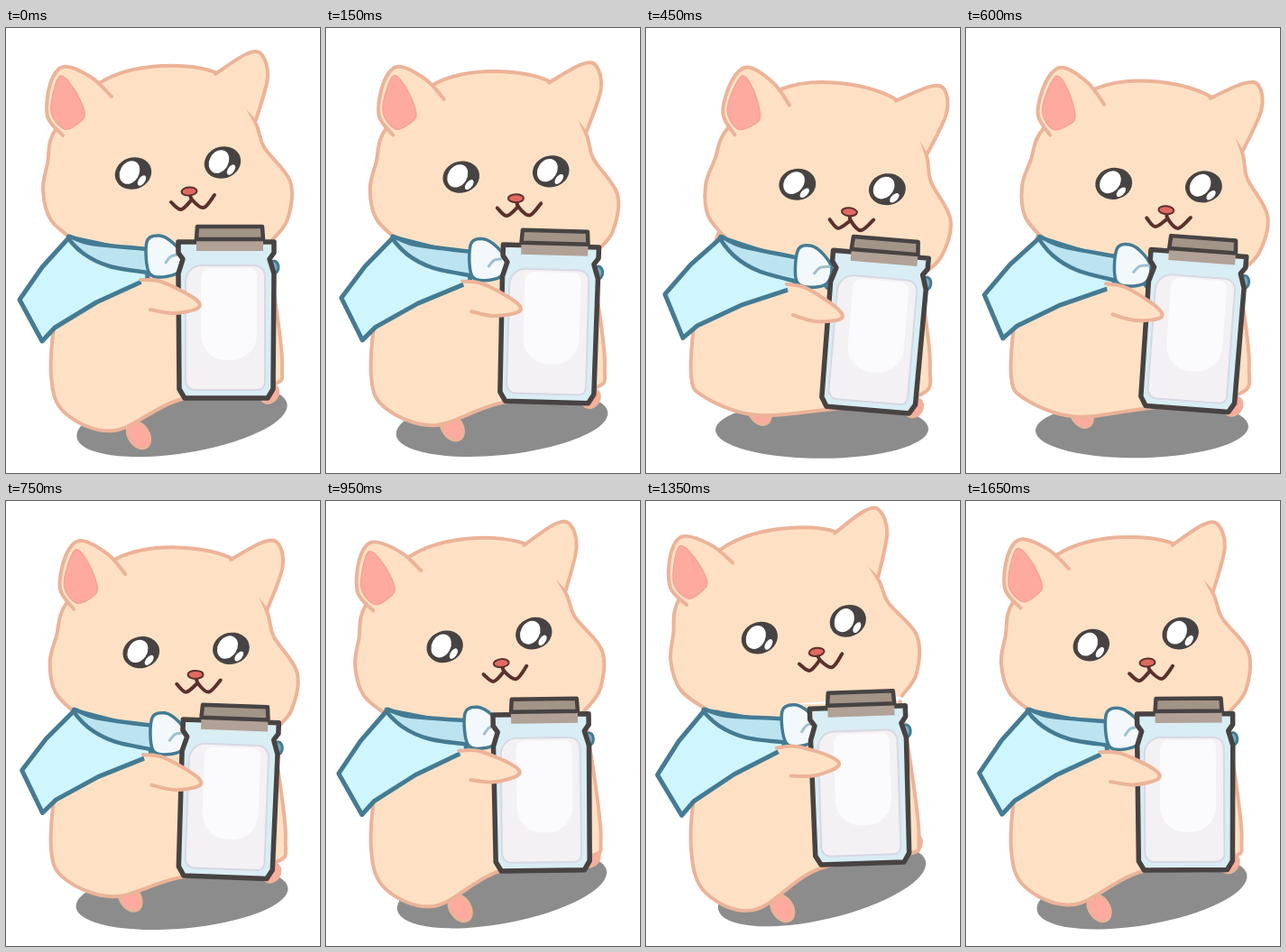
An HTML page with a canvas for the animation above (1.7 s loop, 348 px wide and 493 px high).

```html
<!DOCTYPE html>
<html lang="en">
<head>
<meta charset="utf-8">
<title>Hamster with a milk jar</title>
<style>
html, body { margin: 0; width: 100%; height: 100%; overflow: hidden; background: #fff; }
canvas { display: block; width: 348px; height: 493px; }
</style>
</head>
<body>
<canvas id="stage" width="348" height="493"></canvas>
<script>
const c = document.getElementById('stage').getContext('2d');
const LOOP = 1700, STEP = 50;
const SKIN = '#fee1c4', EDGE = '#ecb398', PINK = '#ffaa9f', DARK = '#474342',
      BLUE = '#447b93', MOUTH = '#5c302d';

// Rest, lean right, swing through, lean left, rest.
const POSES = [
  { t: 0, x: 0, y: 0, tilt: 0 },
  { t: 515, x: 31, y: 24, tilt: 11.5 },
  { t: 950, x: -9.5, y: -1, tilt: -1.6 },
  { t: 1220, x: -21.5, y: -17.5, tilt: -5.4 },
  { t: LOOP, x: 0, y: 0, tilt: 0 }
];

function poseAt(t) {
  const i = POSES.findIndex(p => p.t > t), a = POSES[i - 1], b = POSES[i];
  const p = (t - a.t) / (b.t - a.t);
  const mix = k => a[k] + (b[k] - a[k]) * p;
  return { x: mix('x'), y: mix('y'), tilt: mix('tilt') };
}

function paint(fill, line, width) {
  if (fill) { c.fillStyle = fill; c.fill(); }
  if (line) { c.strokeStyle = line; c.lineWidth = width; c.stroke(); }
}

// Smooth curve through a flat list of x, y values.
function curve(pts, fill, line, width = 4, closed = false) {
  const n = pts.length / 2;
  const at = i => {
    i = closed ? (i + n) % n : Math.max(0, Math.min(n - 1, i));
    return [pts[2 * i], pts[2 * i + 1]];
  };
  c.beginPath();
  c.moveTo(...at(0));
  for (let i = 0; i < (closed ? n : n - 1); i++) {
    const [a, b, d, e] = [at(i - 1), at(i), at(i + 1), at(i + 2)];
    c.bezierCurveTo(b[0] + (d[0] - a[0]) / 6, b[1] + (d[1] - a[1]) / 6,
                    d[0] - (e[0] - b[0]) / 6, d[1] - (e[1] - b[1]) / 6, ...d);
  }
  paint(fill, line, width);
}

function poly(pts, fill, line, width) {
  c.beginPath();
  for (let i = 0; i < pts.length; i += 2) c.lineTo(pts[i], pts[i + 1]);
  c.closePath();
  paint(fill, line, width);
}

// Outline mirrored about x = mid, from [half width, y] pairs.
function mirrored(mid, half, fill, line, width) {
  const right = half.map(([w, y]) => [mid + w, y]);
  const left = half.map(([w, y]) => [mid - w, y]).reverse();
  poly([...right, ...left].flat(), fill, line, width);
}

function oval(x, y, rx, ry, deg, fill, line, width) {
  c.beginPath();
  c.ellipse(x, y, rx, ry, deg * Math.PI / 180, 0, 7);
  paint(fill, line, width);
}

function box(x, y, w, h, r, fill, line, width) {
  c.beginPath();
  c.roundRect(x, y, w, h, r);
  paint(fill, line, width);
}

// Shift a part by (dx, dy) and tilt it about (px, py).
function moved(px, py, dx, dy, deg, draw) {
  c.save();
  c.translate(px + dx, py + dy);
  c.rotate(deg * Math.PI / 180);
  c.translate(-px, -py);
  draw();
  c.restore();
}

// Leaning right flattens the left of the belly and lowers its right.
function body(q) {
  const low = x => (x < 160 ? -18 : 12) * q;
  curve([80, 228, 57, 305, 50, 385, 66, 427, 120, 446 , 192, 412, 292, 396, 306, 375, 298, 300, 285, 222]
    .map((v, i, all) => i % 2 ? v + (v > 390 ? low(all[i - 1]) : 0) : v + (v > 280 ? 9 * q : 0)),
    SKIN, EDGE);
}

function eye(x, y) {
  oval(x, y, 20.5, 17.5, -18, DARK);
  oval(x - 4, y - 1, 10.5, 13.5, 30, '#fff');
  oval(x + 9.5, y + 8, 3.5, 6.5, 35, '#fff');
}

function head() {
  curve([294, 236, 312, 212, 315, 170, 286, 132, 275, 102, 240, 53, 172, 42, 105, 60,
         55, 112, 46, 150, 41, 180, 50, 213, 78, 237], SKIN, EDGE);
  curve([232, 51, 266, 29, 283, 29, 290, 55, 277, 102], SKIN, EDGE);
  curve([117, 76, 95, 55, 64, 43, 49, 62, 46, 98, 63, 119], SKIN, EDGE);
  curve([59, 54, 75, 67, 87, 93, 82, 104, 65, 112, 50, 92], PINK, '#f5a392', 1.5, true);
  eye(141, 161);
  eye(240, 149);
  curve([183, 193, 194, 201, 206, 190], null, MOUTH);
  curve([204, 182, 206, 190, 219, 199, 231, 185], null, MOUTH);
  oval(203, 181, 8.5, 4.5, -4, '#e06a62', MOUTH, 2);
}

function scarf() {
  poly([70, 232, 40, 265, 15, 301, 40, 347, 54, 332, 100, 304, 157, 278, 155, 250],
       '#cff5fe', BLUE, 5);
  curve([157, 271, 115, 264, 86, 250, 69, 231, 95, 239, 160, 245], '#bce4f0', BLUE, 4.5);
  oval(197, 265, 8, 11, 10, '#75abc1', BLUE, 3);
  curve([156, 237, 170, 230, 186, 239, 196, 254, 189, 272, 160, 273], '#f3f8fc', BLUE, 3.5, true);
  curve([193, 251, 183, 253, 177, 260], null, '#9fc0cf', 3);
}

function jar() {
  oval(297, 265, 5, 7, 0, '#75abc1', BLUE, 3);
  mirrored(244, [[53, 237], [53, 249], [48, 256], [53, 272], [52, 400], [46, 410]],
           '#d8edf4', DARK, 5.5);
  box(199, 263, 88, 138, [18, 12, 8, 10], '#f3f1f4', '#d8d8e2', 2);
  box(216, 266, 62, 102, [10, 8, 28, 28], '#fbfafc');
  mirrored(248, [[37, 234], [37, 247]], '#b1a196');
  mirrored(248, [[36, 220], [37, 234]], '#a39488', DARK, 4.5);
}

function arm() {
  curve([149, 279, 172, 281, 208, 299, 213, 310, 186, 316, 160, 312], SKIN, EDGE);
}

function draw(t) {
  const { x, y, tilt } = poseAt(t);
  const q = tilt / 10.3, right = Math.max(q, 0), left = Math.min(q, 0);
  c.fillStyle = '#fff';
  c.fillRect(0, 0, 348, 493);
  c.lineCap = c.lineJoin = 'round';

  oval(195, 435 + 10 * right + 24 * left, 118, 36 - 4 * q, -9 + 9 * right + 11 * left, '#8c8c8c');
  oval(147 - 22 * right - 11 * left, 451 - 27 * right, 11, 16, -32, PINK, EDGE, 3);
  oval(292 + 5 * right - 10 * left, 405 + 16 * right + 65 * left, 9, 11, 35, PINK, EDGE, 3);
  body(q);
  moved(190.5, 155, x, y, tilt, head);
  moved(15, 301, 0.6 * tilt, -0.6 * tilt, 0.62 * tilt, scarf);
  moved(248, 222, 0.65 * x, 0.67 * y, 0.48 * tilt, jar);
  moved(150, 295, 5 * q, 5 * right + 15 * left, 7 * right + 24 * left, arm);
}

function tick() {
  draw(Math.floor(performance.now() % LOOP / STEP) * STEP);
  requestAnimationFrame(tick);
}
tick();
</script>
</body>
</html>
```
